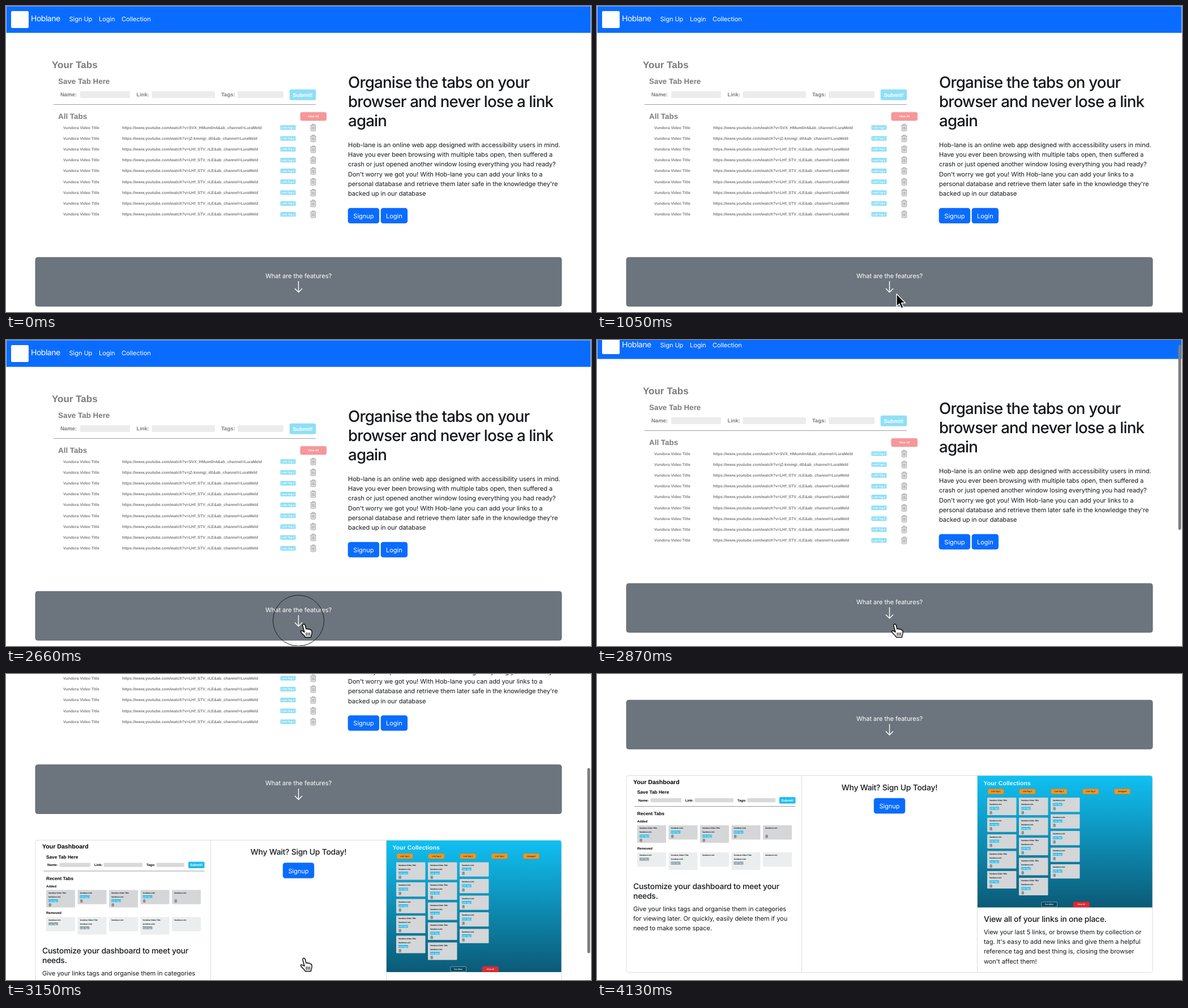
An HTML page that plays this animation: 1033 px wide and 542 px high, repeating every 4480 ms.

```html
<!DOCTYPE html>
<html lang="en">
<head>
<meta charset="utf-8">
<title>Hoblane</title>
<style>
  html, body { margin: 0; height: 100%; overflow: hidden; background: #fff; }
  svg { display: block; width: 100%; height: 100%; }
  text { text-rendering: geometricPrecision; font-optical-sizing: none; }
  .ui { font: 11.1px Inter, sans-serif; letter-spacing: -.007em; fill: #16191c; }
  .h1 { font-size: 27.7px; font-weight: 500; letter-spacing: -.03em; }
  .h5 { font-size: 13.9px; font-weight: 500; letter-spacing: -.016em; }
  .brand { font-size: 13.9px; letter-spacing: -.03em; }
  .mock { font-family: "Liberation Sans", Arial, sans-serif; font-weight: 700; }
  .mid { text-anchor: middle; }
  .white { fill: #fff; }
</style>
</head>
<body>
<svg id="stage" viewBox="0 0 1033 542" preserveAspectRatio="none"></svg>
<script>
const LOOP = 4480, STEP = 70, MAX_SCROLL = 399;
const BLUE = '#0a6cff', CYAN = '#1fbdf0';

const rect = (x, y, w, h, fill, r = 0, extra = '') =>
  `<rect x="${x}" y="${y}" width="${w}" height="${h}" rx="${r}" fill="${fill}" ${extra}/>`;
const line = (x1, x2, y, color) => `<path d="M${x1} ${y}H${x2}" stroke="${color}"/>`;
const glow = color => `stroke="${color}" stroke-opacity=".4" stroke-width="1.4"`;
const ui = (x, y, text, cls = '') => `<text class="ui ${cls}" x="${x}" y="${y}">${text}</text>`;
const lines = (x, y, gap, list, cls) => list.map((s, i) => ui(x, y + i * gap, s, cls)).join('');
const mock = (x, y, size, text, fill = '#000', cls = '') =>
  `<text class="mock ${cls}" x="${x}" y="${y}" font-size="${size}" fill="${fill}">${text}</text>`;
const pill = (x, y, w, h, fill, r, size, text, color = '#fff', extra = '') =>
  rect(x, y, w, h, fill, r, extra) + mock(x + w / 2, y + h / 2 + size * .36, size, text, color, 'mid');
const button = (x, y, w, text) => rect(x, y, w, 27.4, BLUE, 4.3) + ui(x + w / 2, y + 18.2, text, 'mid white');
const trash = (x, y, scale, color) =>
  `<path transform="translate(${x} ${y}) scale(${scale})" fill="#0001" stroke="${color}" stroke-width=".9" stroke-linejoin="round"
    d="M-5 -4H5M-2 -4V-6H2V-4M-4.2 -4V5Q-4.2 6 -3 6H3Q4.2 6 4.2 5V-4M-1.8 -2V4M0 -2V4M1.8 -2V4"/>`;

function header() {
  return rect(.6, .4, 1031.8, 47.2, BLUE) + rect(9, 9, 31, 30, '#fff', 2) +
    ui(44, 26.5, 'Hoblane', 'brand white') + ui(111.5, 27.3, 'Sign Up', 'white') +
    ui(164, 27.3, 'Login', 'white') + ui(204, 27.3, 'Collection', 'white');
}

function tabsMock() {
  const grey = '#7c7c7c', cyan = '#8edff6', red = '#f69799';
  const ids = ['SVX_HMum0n4', 'jZ-kmmgi_d0'];
  let out = mock(81, 110, 17, 'Your Tabs', grey) + mock(92, 138.3, 13.4, 'Save Tab Here', grey) +
    mock(96, 160.2, 9.5, 'Name:', grey) + mock(230.5, 160.2, 9.3, 'Link:', grey) + mock(380, 160.2, 9.5, 'Tags:', grey) +
    rect(131, 151, 88, 12, '#ececec', 2) + rect(257.5, 151, 111.5, 12, '#ececec', 2) + rect(409, 151, 81, 12, '#ececec', 2) +
    pill(501, 148, 46, 18.5, cyan, 3, 9.4, 'Submit!', '#fff', glow(cyan)) + line(84, 547, 174.5, '#a0a0a0') +
    mock(92, 200.2, 13.4, 'All Tabs', grey) + pill(519.8, 188.2, 46, 14.8, red, 3, 4.7, 'Clear All', '#fff', glow(red));
  for (let i = 0; i < 9; i++) {
    const y = 215.3 + i * 19.2;
    out += mock(101, y + 2.3, 6.85, 'Vundora Video Title', grey) +
      mock(205, y + 2.3, 6.95, `https://www.youtube.com/watch?v=${ids[i] || 'LHf_STV_rLE'}&amp;ab_channel=LuraMeld`, grey) +
      pill(484.5, y - 4, 27, 8, cyan, 1, 4.7, `Link Tag ${1 + Math.floor(i / 3)}`) +
      trash(542.5, y, 1, '#999');
  }
  return out;
}

function intro() {
  return lines(604, 144.6, 34.4, ['Organise the tabs on your', 'browser and never lose a link', 'again'], 'h1') +
    lines(604, 250, 17.2, [
      'Hob-lane is an online web app designed with accessibility users in mind.',
      'Have you ever been browsing with multiple tabs open, then suffered a',
      'crash or just opened another window losing everything you had ready?',
      "Don't worry we got you! With Hob-lane you can add your links to a",
      "personal database and retrieve them later safe in the knowledge they're",
      'backed up in our database']) +
    button(603.7, 357.7, 55.4, 'Signup') + button(661.7, 357.7, 47.4, 'Login');
}

function featuresBar() {
  return rect(52, 445.3, 929, 86.6, '#6c757d', 4, 'stroke="#646c73"') +
    ui(516.5, 481.5, 'What are the features?', 'mid white') +
    '<path d="M516.5 488V507M510.3 500.8L516.5 507L522.7 500.8" fill="none" stroke="#fff" stroke-width="1.4" stroke-linecap="round" stroke-linejoin="round"/>';
}

// A small link card; its rows are a subset of title, link, tag and bin.
function card(x, y, w, { title, tag, bin = true, fill = '#d4d6d7', tagFill = CYAN }) {
  let row = 0;
  const next = () => y + 5 + 7 * row++;
  let out = rect(x, y, w, title ? 31 : 25.2, fill, 1);
  if (title) out += mock(x + 4, next() + 1.2, 3.35, 'Vundora Video Title');
  out += mock(x + 4, next() + 1.2, 3.35, 'Vundora Link');
  if (tag) out += pill(x + 4, next() - 2.5, 17, 5, tagFill, .6, 3.3, `Link Tag ${tag}`);
  else row++;
  if (bin) out += trash(x + 6.7, next() + .6, .42, '#333');
  return out;
}

function dashboard() {
  const added = [{ title: 1, tag: 1 }, { tag: 1 }, { title: 1, tag: 2 }, { tag: 1 }, {}];
  const removed = [{ tag: 2 }, { title: 1, tag: 1 }, {}, { title: 1, tag: 2 }, {}];
  const old = { bin: false, fill: '#ebeeee', tagFill: '#7f98a3' };
  const x = i => 71 + 55.5 * i;
  return mock(64, 194.5, 10.6, 'Your Dashboard') + mock(71, 212, 8.25, 'Save Tab Here') +
    mock(73, 225.7, 6, 'Name:') + mock(156, 225.7, 6, 'Link:') + mock(248, 225.7, 6, 'Tags:') +
    rect(94.5, 220, 54.5, 7.2, '#d9d9d9', 1) + rect(172.5, 220, 68.5, 7.2, '#d9d9d9', 1) + rect(265.5, 220, 49.5, 7.2, '#d9d9d9', 1) +
    pill(322, 218, 28.5, 11.5, CYAN, 1.5, 5.9, 'Submit!') + line(66, 350.5, 234.5, '#999') +
    mock(71, 250, 8.2, 'Recent Tabs') + mock(71, 263.2, 5.8, 'Added') + mock(71, 310.6, 6, 'Removed') +
    added.map((c, i) => card(x(i), 268, 51, c)).join('') +
    removed.map((c, i) => card(x(i), 316, 51, { ...c, ...old })).join('') +
    lines(64, 380.7, 17.2, ['Customize your dashboard to meet your', 'needs.'], 'h5') +
    lines(64, 419.7, 17.2, [
      'Give your links tags and organise them in categories',
      'for viewing later. Or quickly, easily delete them if you',
      'need to make some space.']);
}

function collections() {
  let out = '<path d="M672 413.5V180H977Q981 180 981 184V413.5Z" fill="url(#sea)"/>' +
    mock(682.5, 196.5, 10.6, 'Your Collections', '#e4f7fe');
  ['Link Tag 1', 'Link Tag 2', 'Link Tag 3', 'Link Tag 4', 'Untagged'].forEach((label, i) => {
    out += pill(690 + 55.8 * i, 203.5, 28.5, 9.2, '#f7941d', 2, 3.3, label, '#222', 'stroke="#7a8a6a" stroke-opacity=".5" stroke-width=".8"');
  });
  // One digit per card: 1 has a title row, 0 has not.
  ['10011', '11111', '00000'].forEach((column, c) => {
    let y = 219;
    for (const digit of column) {
      const title = digit === '1';
      out += card(689 + 56 * c, y, 51.5, { title, tag: c + 1 });
      y += title ? 35.5 : 29.5;
    }
  });
  return out +
    pill(784.8, 403.8, 27.8, 9, '#0a4a62', 1.5, 3.3, 'See More', '#fff', 'stroke="#9fc4d2" stroke-width=".7"') +
    pill(841, 403.5, 28.8, 9.5, '#e8262c', 1.5, 3.3, 'Clear All') +
    ui(683, 439, 'View all of your links in one place.', 'h5') +
    lines(683, 461, 17.2, [
      'View your last 5 links, or browse them by collection or',
      "tag. It's easy to add new links and give them a helpful",
      'reference tag and best thing is, closing the browser',
      "won't affect them!"]);
}

function featureCards() {
  return `<g transform="translate(0 ${MAX_SCROLL})">` + dashboard() +
    ui(516.5, 205.5, 'Why Wait? Sign Up Today!', 'h5 mid') + button(488.8, 219.8, 55.4, 'Signup') + collections() +
    rect(52, 179.8, 929, 348.7, 'none', 4, 'stroke="#dcdcdc"') +
    '<path d="M361.5 180V528M671.5 180V528" stroke="#dcdcdc"/></g>';
}

document.getElementById('stage').innerHTML = `
  <defs><linearGradient id="sea" x2="0" y2="1">
    <stop stop-color="#10c0f3"/><stop offset="1" stop-color="#0b5a76"/>
  </linearGradient></defs>
  <g id="page">${header()}${tabsMock()}${intro()}${featuresBar()}${featureCards()}</g>
  <circle id="ring" cx="516.5" cy="497" r="45" fill="none" stroke="#1c1f22"/>
  <rect id="thumb" x="1026.5" width="5" height="328" rx="2.5" fill="#7d7d7d"/>
  <g id="cursor" stroke-linejoin="round" stroke-linecap="round">
    <path id="arrow" d="M0 0V22L5 17.5L8.5 25.5L12 24L8.7 16H15.5Z" fill="#000" stroke="#fff" stroke-width="1.4"/>
    <g id="hand" transform="translate(-6 -1)" stroke="#000" stroke-width="1.4">
      <path fill="#fff" d="M8 15.5L5 4.5Q4.5 1.5 6.7 1.2Q8.6 1 9.3 3.5L11 10Q13.5 8.6 14.6 10.5Q17 9.3 18 11.5Q20.6 11 21 14Q21.5 18 20 21L19.5 24.5H9.5Q8.5 22 5 19Q1 15.5 1.5 13.5Q3 12 8 15.5Z"/>
      <path fill="none" stroke-width="1.2" d="M11.3 16.5V21.5M14.3 16.5V21.5M17.3 16.5V21.5"/>
    </g>
  </g>`;

const part = id => document.getElementById(id);
const [page, ring, thumb, cursor, arrow, hand] = ['page', 'ring', 'thumb', 'cursor', 'arrow', 'hand'].map(part);

const scrollKeys = [[2730, 0], [2800, 3], [2870, 14], [2940, 47], [3010, 107.5], [3080, 196],
  [3150, 284.5], [3220, 345], [3290, 385.5], [3360, 397], [3430, MAX_SCROLL]];
const cursorKeys = [[630, 690, 545], [700, 640, 530], [770, 585, 514], [840, 555, 510], [910, 555, 510],
  [980, 541, 508], [1050, 529, 510], [1120, 526, 510], [1190, 522, 504], [1330, 520, 501], [1470, 521, 501],
  [1540, 522, 500], [2170, 522, 500], [2240, 523, 505], [2380, 523, 505], [2450, 525, 503]];

// Linear interpolation between keys of the form [time, ...values].
function at(keys, t) {
  const i = keys.findIndex(k => k[0] > t);
  if (i < 0) return keys[keys.length - 1].slice(1);
  if (i === 0) return keys[0].slice(1);
  const a = keys[i - 1], b = keys[i], p = (t - a[0]) / (b[0] - a[0]);
  return a.slice(1).map((v, n) => v + (b[n + 1] - v) * p);
}

function draw(now) {
  const t = Math.floor(now % LOOP / STEP) * STEP;
  const [scroll] = at(scrollKeys, t);
  const [x, y] = at(cursorKeys, t);
  const fade = t < 3850 ? 1 : Math.max(0, (4130 - t) / 350);
  const overLink = t >= 1190;

  page.setAttribute('transform', `translate(0 ${-scroll})`);
  thumb.setAttribute('y', scroll * .585);
  thumb.setAttribute('opacity', t < 2800 ? 0 : fade);
  ring.setAttribute('opacity', t < 2590 || t >= 2800 ? 0 : t < 2660 ? .5 : 1);
  cursor.setAttribute('transform', `translate(${x} ${y})`);
  cursor.setAttribute('opacity', t < 630 ? 0 : fade);
  arrow.setAttribute('visibility', overLink ? 'hidden' : 'visible');
  hand.setAttribute('visibility', overLink ? 'visible' : 'hidden');
}

const start = performance.now();
(function tick() {
  draw(performance.now() - start);
  requestAnimationFrame(tick);
})();
</script>
</body>
</html>
```
